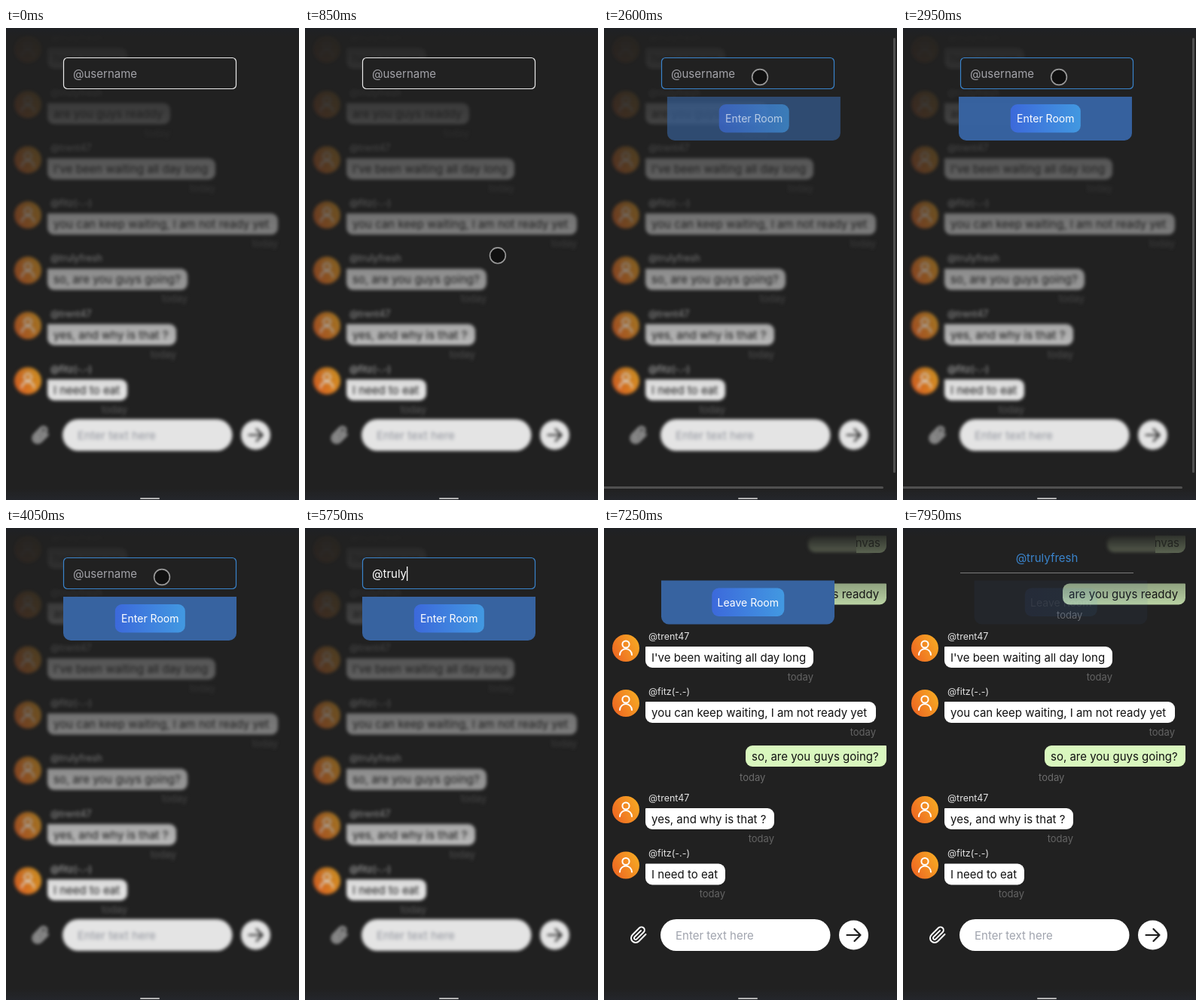
These frames come from a looping animation (389 by 625 pixels, 8 s). An HTML page with a canvas:

```html
<!DOCTYPE html>
<html lang="en">
<head>
<meta charset="utf-8">
<title>Chat room</title>
<style>
html, body { margin: 0; width: 100%; height: 100%; overflow: hidden; background: #212121; }
canvas { display: block; }
</style>
</head>
<body>
<canvas id="stage" width="389" height="625"></canvas>
<script>
const W = 389, H = 625, LOOP = 8000;
const ctx = document.getElementById('stage').getContext('2d');
const BG = '#212121', BLUE = [58, 132, 204];
const USER = '@trulyfresh';
const KEYS = [5000, 5150, 5250, 5450, 5650, 5750, 6000, 6450, 6550, 6700, 6950];
const JOIN = 7250;

const clamp = v => Math.max(0, Math.min(1, v));
const span = (t, a, b) => clamp((t - a) / (b - a));
const smooth = p => p * p * (3 - 2 * p);
const mix = (a, b, p) => a + (b - a) * p;

function layer(draw) {
  const c = document.createElement('canvas');
  c.width = W;
  c.height = H;
  draw(c.getContext('2d'), c);
  return c;
}

function label(g, str, x, y, size, color, align = 'left') {
  g.font = `${size}px Inter, Roboto, sans-serif`;
  g.textAlign = align;
  g.fillStyle = color;
  g.fillText(str, x, y);
}

function box(g, x, y, w, h, r, fill) {
  g.beginPath();
  g.roundRect(x, y, w, h, r);
  g.fillStyle = fill;
  g.fill();
}

function circle(g, x, y, r, stroke, width, fill) {
  g.beginPath();
  g.arc(x, y, r, 0, Math.PI * 2);
  if (fill) { g.fillStyle = fill; g.fill(); }
  if (stroke) { g.strokeStyle = stroke; g.lineWidth = width; g.stroke(); }
}

function ramp(g, x0, y0, x1, y1, stops) {
  const grad = g.createLinearGradient(x0, y0, x1, y1);
  for (const [at, color] of stops) grad.addColorStop(at, color);
  return grad;
}

// Fades a layer by height; stops are [y, alpha].
function fade(g, stops) {
  g.globalCompositeOperation = 'destination-in';
  g.fillStyle = ramp(g, 0, 0, 0, H, stops.map(([y, a]) => [y / H, `rgba(0,0,0,${a})`]));
  g.fillRect(0, 0, W, H);
  g.globalCompositeOperation = 'source-over';
}

function avatar(g, y) {
  const x = 29;
  circle(g, x, y, 18, null, 0, ramp(g, x - 16, y + 8, x + 16, y - 8, [[0, '#ee6a22'], [1, '#f6a623']]));
  circle(g, x, y - 5, 4.6, '#fff', 2);
  g.lineCap = 'round';
  g.beginPath();
  g.arc(x, y + 9, 8, Math.PI, 0);
  g.stroke();
}

// y is the top of the bubble
function incoming(g, y, w, name, text) {
  avatar(g, y + 2);
  label(g, name, 59, y - 9.5, 12.5, '#e2e2e2');
  box(g, 55, y, w, 28, [1, 9, 9, 9], '#fff');
  label(g, text, 63, y + 19.5, 15, '#111');
  label(g, 'today', 55 + w, y + 44.5, 13, '#646464', 'right');
}

function outgoing(g, y, w, text) {
  const x = 375 - w;
  box(g, x, y, w, 28, [9, 1, 9, 9], '#d9f7be');
  label(g, text, x + 8, y + 19.5, 15, '#111');
  label(g, 'today', x - 8, y + 46.5, 13, '#6c6c6c');
}

function composer(g) {
  const clip = new Path2D('M21.44 11.05l-9.19 9.19a6 6 0 0 1-8.49-8.49l9.19-9.19a4 4 0 0 1 5.66 5.66l-9.2 9.19a2 2 0 0 1-2.83-2.83l8.49-8.48');
  g.lineCap = g.lineJoin = 'round';
  g.strokeStyle = '#fff';
  g.lineWidth = 2;
  g.save();
  g.translate(34, 527);
  g.stroke(clip);
  g.restore();

  box(g, 75, 518, 225.5, 42, 21, '#fff');
  label(g, 'Enter text here', 95, 545, 15, '#a0a4ae');
  circle(g, 331.5, 539, 19.5, null, 0, '#fff');
  g.strokeStyle = '#1c1c1c';
  g.lineWidth = 2.2;
  g.beginPath();
  g.moveTo(322.5, 539);
  g.lineTo(340.5, 539);
  g.moveTo(332.5, 531);
  g.lineTo(340.5, 539);
  g.lineTo(332.5, 547);
  g.stroke();
}

function frameEdges(g) {
  g.fillStyle = ramp(g, 0, 0, 0, 12, [[0, '#1f2125'], [1, 'rgba(31,33,37,0)']]);
  g.fillRect(0, 0, W, 12);
  g.fillStyle = ramp(g, 0, 610, 0, H, [[0, 'rgba(36,38,43,0)'], [1, '#24262b']]);
  g.fillRect(0, 610, W, 15);
  box(g, 178, 622, 26, 2, 1, '#b4b4b4');
}

const A = '@trent47', B = '@fitz(-.-)';
const LINES = {
  first: 'hello canvas',
  ready: 'are you guys readdy',
  wait: "I've been waiting all day long",
  keep: 'you can keep waiting, I am not ready yet',
  going: 'so, are you guys going?',
  why: 'yes, and why is that ?',
  eat: 'I need to eat'
};

const lobby = layer(g => {
  const sharp = layer(s => {
    const rows = [
      [106, USER, LINES.first], [163, USER, LINES.ready], [223, A, LINES.wait],
      [306, B, LINES.keep], [186, USER, LINES.going], [171, A, LINES.why], [106, B, LINES.eat]
    ];
    rows.forEach(([w, name, text], i) => incoming(s, 26 + i * 73.2, w, name, text));
    composer(s);
  });
  const soft = layer(s => {
    s.filter = 'blur(2.3px)';
    s.drawImage(sharp, 0, 0);
    s.filter = 'none';
    fade(s, [[0, 0.02], [40, 0.05], [113, 0.13], [187, 0.26], [260, 0.39],
      [333, 0.51], [406, 0.64], [479, 0.87], [H, 0.89]]);
  });
  g.fillStyle = BG;
  g.fillRect(0, 0, W, H);
  g.drawImage(soft, 0, 0);
  frameEdges(g);
});

const room = layer(g => {
  const chat = layer(s => {
    outgoing(s, 73.5, 163, LINES.ready);
    incoming(s, 157, 223, A, LINES.wait);
    incoming(s, 230, 306, B, LINES.keep);
    outgoing(s, 288, 187, LINES.going);
    incoming(s, 371, 171, A, LINES.why);
    incoming(s, 444.5, 106, B, LINES.eat);
    composer(s);
    fade(s, [[0, 0], [122, 1], [H, 1]]);
  });
  g.fillStyle = BG;
  g.fillRect(0, 0, W, H);
  g.drawImage(chat, 0, 0);

  // oldest message, half scrolled out under the blurred header
  g.save();
  g.filter = 'blur(2px)';
  box(g, 271, 11, 90, 21, 9, ramp(g, 0, 10, 0, 33, [[0, '#262725'], [1, '#555b4c']]));
  g.restore();
  box(g, 335, 10, 40, 23, [0, 1, 9, 0], ramp(g, 0, 10, 0, 33, [[0, '#30332d'], [1, '#5a6350']]));
  g.save();
  g.beginPath();
  g.rect(335, 8, 40, 25);
  g.clip();
  label(g, LINES.first, 367, 25, 15, '#222420', 'right');
  g.restore();
  frameEdges(g);
});

function panel(x, y, alpha, text, bw) {
  ctx.save();
  ctx.globalAlpha = alpha;
  ctx.translate(x, y);
  box(ctx, 76, 0, 230, 58, [0, 0, 10, 10], '#3763a0');
  const bx = 191.3 - bw / 2;
  box(ctx, bx, 10, bw, 37.5, 9, ramp(ctx, bx, 0, bx + bw, 0, [[0, '#3c69db'], [1, '#4299e1']]));
  label(ctx, text, 191.3, 34, 14, '#fff', 'center');
  ctx.restore();
}

function field(t) {
  const p = span(t, 1850, 2000);
  const rgb = BLUE.map(c => Math.round(mix(235, c, p)));
  box(ctx, 76, 39, 230, 42, 5, BG);
  ctx.beginPath();
  ctx.roundRect(76.5, 39.5, 229, 41, 5);
  ctx.strokeStyle = `rgb(${rgb})`;
  ctx.lineWidth = 1.2;
  ctx.stroke();

  const typed = USER.slice(0, KEYS.filter(k => k <= t).length);
  if (typed) label(ctx, typed, 89, 66, 15, '#fff');
  else label(ctx, '@username', 89, 66, 15, '#a2a2a8');

  const caret = (t >= 3500 && t < 4050) || t >= 4500;
  if (caret) {
    const x = typed ? 89 + ctx.measureText(typed).width : 89;
    ctx.fillStyle = '#fff';
    ctx.fillRect(Math.round(x), 51, 1.3, 19);
  }
}

function pointer(t) {
  if (t < 450 || t >= KEYS[0]) return;
  const p = smooth(span(t, 420, 1200));
  const x = mix(323, 207, p);
  const y = mix(601, 83, p) - 16 * smooth(span(t, 1300, 1500)) - 2 * span(t, 1880, 2000);
  const tap = (t >= 1650 && t < 1750) || (t >= 2200 && t < 2350);
  if (tap) {
    circle(ctx, x, y, 22.3, '#d0d0d0', 1, 'rgba(33,33,33,0.6)');
    circle(ctx, x, y, 19.8, '#8c8c8c', 1);
  }
  circle(ctx, x, y, 10.4, '#9a9a9a', 1.6, '#101010');
}

function scrollbars(t) {
  const a = t < 2500 ? 0 : 1 - span(t, 3100, 3300);
  if (!a) return;
  ctx.globalAlpha = a;
  box(ctx, 384, 13, 3, 576, 1.5, '#505050');
  box(ctx, -2, 607, 373, 3, 1.5, '#505050');
  ctx.globalAlpha = 1;
}

function drawLobby(t) {
  ctx.drawImage(lobby, 0, 0);
  field(t);
  if (t >= 2500) {
    const s = (t - 2500) / 1000;
    const x = 15.3 * Math.exp(-4.4 * s) * Math.cos(6.3 * s);
    panel(s > 1 ? 0 : x, 91, 1 - Math.exp(-s * 10), 'Enter Room', 93);
  }
  scrollbars(t);
  pointer(t);
}

function drawRoom(t) {
  ctx.drawImage(room, 0, 0);
  const out = span(t, 7720, 7970);
  const shown = span(t, 7720, 7900);
  ctx.globalAlpha = shown;
  label(ctx, USER, 191, 45, 15, `rgb(${BLUE})`, 'center');
  ctx.fillStyle = '#7a7a7a';
  ctx.fillRect(76, 59, 230, 1);
  ctx.globalAlpha = 1;
  if (out < 1) panel(20 * out, 69.5, 1 - out, 'Leave Room', 96);
}

const start = performance.now();
function tick() {
  const t = (performance.now() - start) % LOOP;
  if (t < JOIN) drawLobby(t);
  else drawRoom(t);
  requestAnimationFrame(tick);
}
tick();
</script>
</body>
</html>
```
